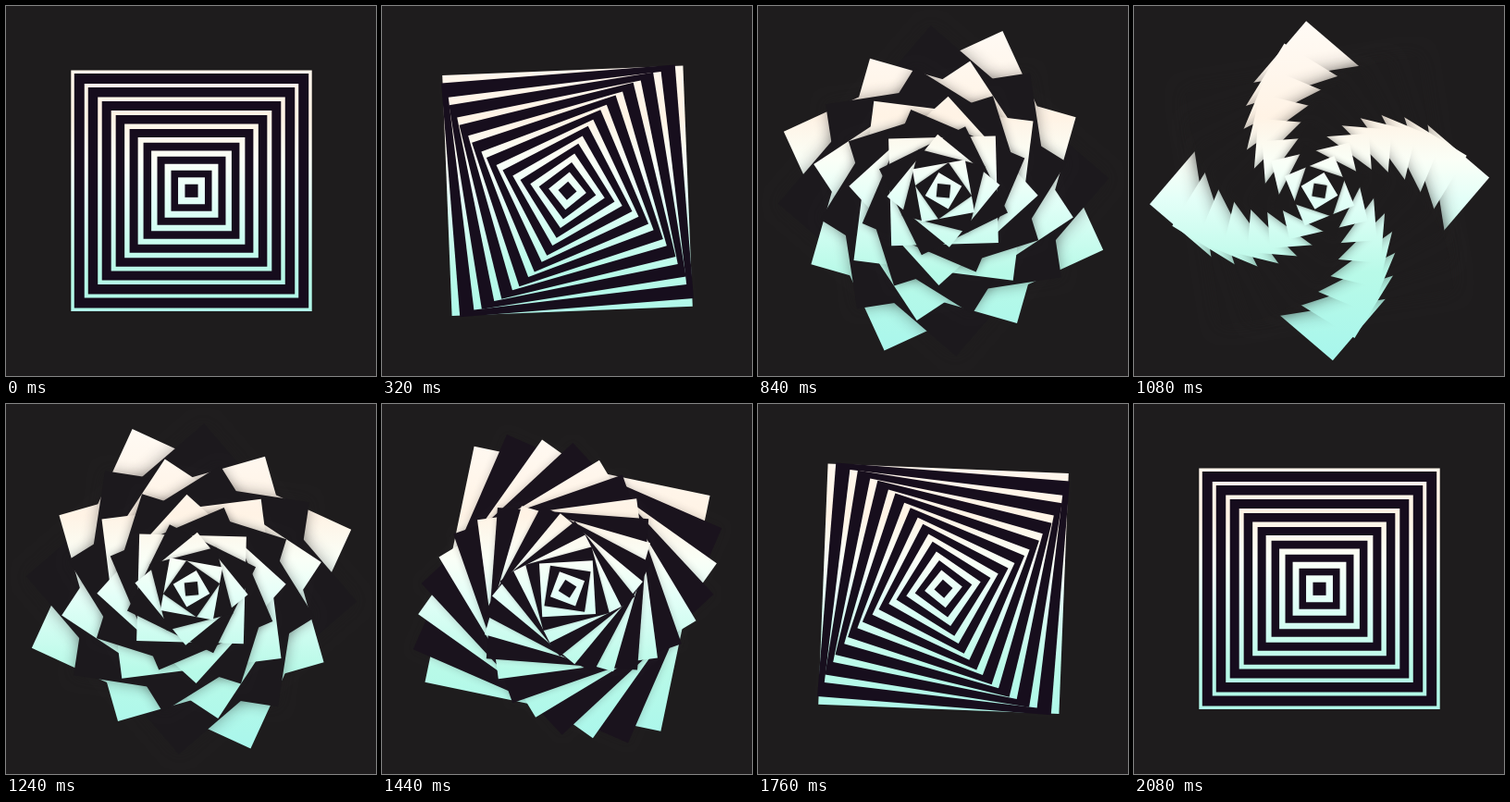
An HTML page with a canvas that plays this animation: 400 by 400 pixels, repeating every 2120 ms.

```html
<!DOCTYPE html>
<html>
<head>
<meta charset="utf-8">
<style>
html, body { margin: 0; width: 100%; height: 100%; overflow: hidden; background: #1e1c1d; }
canvas { display: block; }
</style>
</head>
<body>
<canvas id="stage" width="400" height="400"></canvas>
<script>
const ctx = document.getElementById('stage').getContext('2d');
const STEP = 40, STEPS = 53, RINGS = 9, CX = 200.5, CY = 199.8, OUTER = 130.2;
const BACK = '#1e1c1d';

const light = ctx.createLinearGradient(0, 0, 0, 400);
[[0.06, '#fffaf4'], [0.3, '#fff3e5'], [0.42, '#fafff7'], [0.52, '#e4fff8'],
 [0.72, '#b8fae8'], [0.95, '#a8f6ec']].forEach(([at, color]) => light.addColorStop(at, color));

// Symmetric bezier ease with handles (a, 0) and (1 - a, 1).
function ease(u, a = 0.615) {
  let low = 0, high = 1, t;
  for (let i = 0; i < 24; i++) {
    t = (low + high) / 2;
    const x = 3 * a * t * (1 - t) ** 2 + 3 * (1 - a) * t * t * (1 - t) + t ** 3;
    if (x < u) low = t; else high = t;
  }
  return t * t * (3 - 2 * t);
}

function square(half, turn, fill) {
  const r = half * Math.SQRT2;
  ctx.beginPath();
  for (let k = 0; k < 4; k++) {
    const a = turn + (k + 0.5) * Math.PI / 2;
    ctx.lineTo(CX + r * Math.cos(a), CY + r * Math.sin(a));
  }
  ctx.closePath();
  ctx.fillStyle = fill;
  ctx.fill();
}

function draw(now) {
  const e = ease(Math.floor(now / STEP) % STEPS / (STEPS - 1));
  const turn = -Math.PI / 2 * e;
  const twist = 4 * e * (1 - e);
  const tint = 1 - twist;
  const dark = `rgb(${30 - 8 * tint}, ${28 - 16 * tint}, 29)`;

  ctx.shadowColor = 'transparent';
  ctx.fillStyle = BACK;
  ctx.fillRect(0, 0, 400, 400);

  // Each layer turns one quarter further than the one around it.
  for (let i = 0; i < RINGS; i++) {
    const half = OUTER * (RINGS - i) / RINGS;
    const line = 3.5 + 3.9 * i / (RINGS - 1);
    ctx.shadowColor = 'transparent';
    square(half, turn * (2 * i + 1), light);
    ctx.shadowColor = `rgba(30, 28, 29, ${0.5 * twist})`;
    ctx.shadowBlur = half * 0.16 * twist;
    square(half - line, turn * (2 * i + 2), dark);
  }
}

function loop() {
  draw(performance.now());
  requestAnimationFrame(loop);
}
loop();
</script>
</body>
</html>
```
